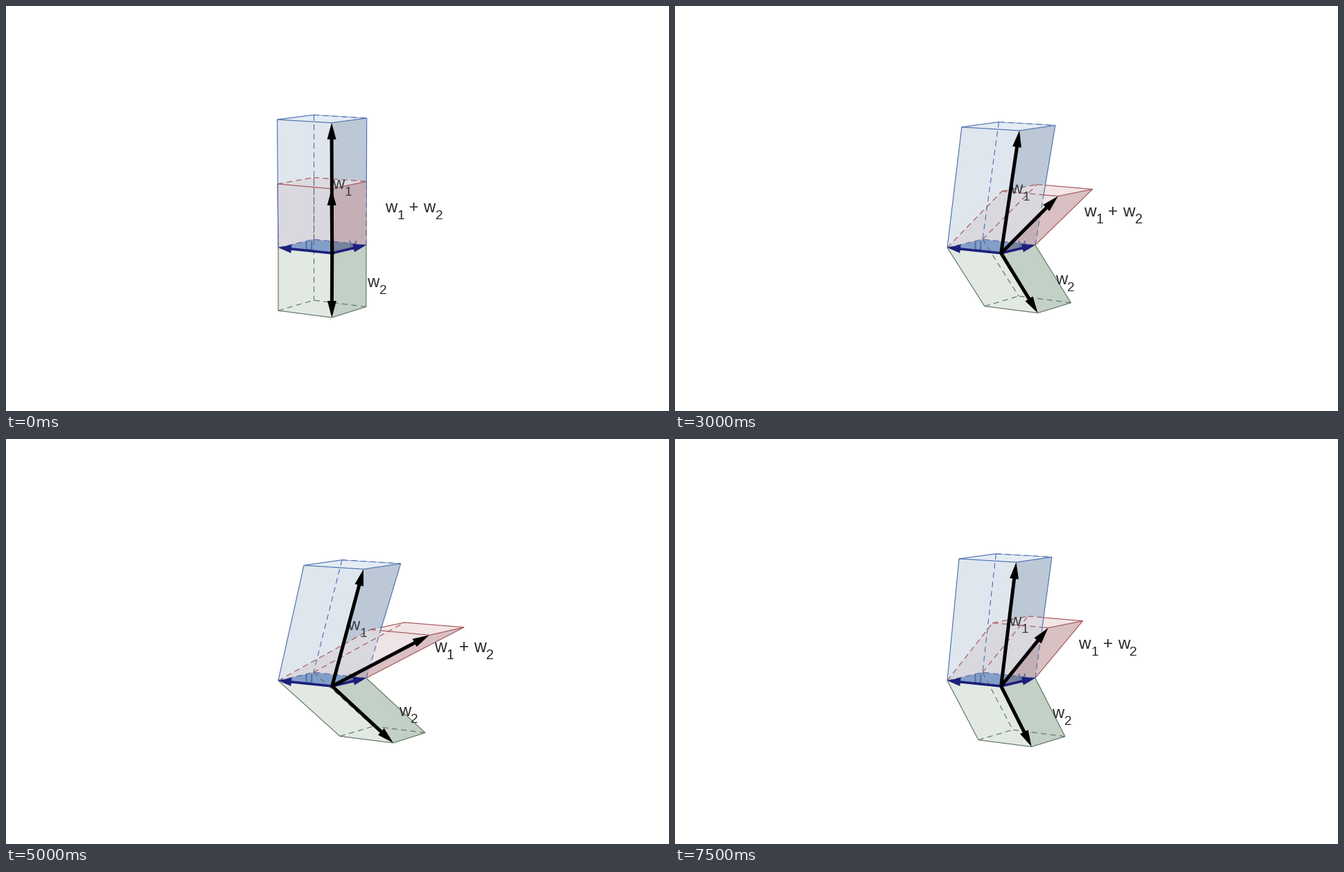
Write a matplotlib script that moves like this. It is 957 by 585 pixels and loops after 8000 ms.

```python
import matplotlib.pyplot as plt
import numpy as np
from matplotlib.animation import FuncAnimation
from matplotlib.patches import Polygon

W, H, DPI = 957, 585, 100
PX = 72 / DPI
STEPS, FRAMES, INTERVAL = 10, 16, 500

plt.rcParams["font.family"] = "Liberation Sans"
fig = plt.figure(figsize=(W / DPI, H / DPI), dpi=DPI, facecolor="white")
ax = fig.add_axes([0, 0, 1, 1])

# Corners run left, front, right, back.
BASE = np.array([(393, 349), (470.7, 357), (520, 345.3), (444, 337)])

# Far face of each box at the start, middle and end of the swing.
BLUE = np.array([
    [(391.5, 164), (470, 168.7), (520.7, 162), (444, 157.3)],
    [(410, 173), (492.5, 178), (544, 170.5), (463.3, 165.8)],
    [(430, 182.5), (516, 188), (569.7, 180), (485, 174.7)],
])
RED = np.array([
    [(392, 257), (470, 264), (520.3, 253.5), (444, 247.7)],
    [(458.5, 265.7), (538.7, 272.7), (588.5, 262.8), (509.5, 256)],
    [(526, 275.3), (611, 283.3), (661, 272), (575.5, 265)],
])
GREEN = np.array([
    [(393, 440), (470.3, 450), (519.8, 434.5), (444, 425)],
    [(438, 434.7), (514.7, 444.5), (563, 429.7), (487.5, 420)],
    [(482, 429.3), (559, 439), (605, 424.3), (530, 415)],
])

BLUE_EDGE, RED_EDGE, GREEN_EDGE = "#4a70b0", "#a25556", "#5f7263"
NAVY = "#1c1f7c"


def swing(keys, p):
    """Quadratic through the three key poses, p from 0 to 1."""
    a, m, b = keys
    return a * (1 - p) * (1 - 2 * p) + m * 4 * p * (1 - p) + b * p * (2 * p - 1)


def face(points, color, z, clip=None):
    patch = Polygon(points, closed=True, fc=color, ec="none", lw=0, zorder=z)
    ax.add_patch(patch)
    if clip is not None:
        patch.set_clip_path(clip)
    return patch


def edge(points, color, z, dashed=False, clip=None, width=1.15):
    xs, ys = np.transpose(points)
    line, = ax.plot(xs, ys, color=color, lw=width * PX, zorder=z,
                    solid_capstyle="butt", dash_capstyle="butt")
    if dashed:
        line.set_dashes((8 / width, 5.5 / width))
    if clip is not None:
        line.set_clip_path(clip)


def arrow(tail, tip, color, z, width, length, half):
    d = (tip - tail) / np.hypot(*(tip - tail))
    n = np.array([-d[1], d[0]])
    neck = tip - d * length
    edge([tail, neck + d], color, z, width=width)
    face([tip, neck + n * half, neck - n * half], color, z)


def label(x, y, parts, size, color, z):
    """Write (text, is_subscript) parts one after another."""
    for text, sub in parts:
        t = ax.text(x, y + 10 * sub, text, fontsize=size * (0.8 if sub else 1) * PX,
                    color=color, va="baseline", ha="left", zorder=z)
        advance = {"w": 0.722, " + ": 1.14}.get(text, 0.556 * 0.8)
        x += advance * size


def sides(top):
    left = [BASE[0], BASE[1], top[1], top[0]]
    right = [BASE[1], BASE[2], top[2], top[1]]
    return left, right


def green_box(top):
    left, right = sides(top)
    face(left, "#e2e9e3", 1)
    face(right, "#c3d0c6", 1)
    edge([BASE[0], top[0], top[1], top[2], BASE[2]], GREEN_EDGE, 2)
    edge([BASE[3], top[3]], GREEN_EDGE, 8, dashed=True)
    edge([top[0], top[3]], GREEN_EDGE, 8, dashed=True)
    edge([top[2], top[3]], GREEN_EDGE, 8, dashed=True)


def red_box(top):
    left, right = sides(top)
    face(left, "#eee3e5", 3)
    face(right, "#d9c0c2", 3)
    face(top, "#f3e5e6", 3)
    edge([BASE[0], top[0], top[1], top[2], BASE[2]], RED_EDGE, 4)
    edge([top[0], top[3], top[2]], RED_EDGE, 4)
    edge([BASE[3], top[3]], RED_EDGE, 8, dashed=True)


def blue_box(top):
    left, right = sides(top)
    face(left, "#e0e6ee", 5)
    face(right, "#bcc8d6", 5)
    face(top, "#e5ecf5", 5)
    edge([BASE[0], top[0], top[1], top[2]], BLUE_EDGE, 9)
    edge([top[0], top[3]], BLUE_EDGE, 9)
    edge([top[3], top[2]], BLUE_EDGE, 9, width=0.6)
    edge([top[3], top[2]], BLUE_EDGE, 9, dashed=True)
    edge([top[3], BASE[3]], BLUE_EDGE, 9, dashed=True)
    # The right edge is hidden where the red box stands before it.
    out = BASE[2] + 0.43 * (top[2] - BASE[2])
    edge([BASE[2], out], BLUE_EDGE, 9, dashed=True)
    edge([out, top[2]], BLUE_EDGE, 9)


def overlap(blue, red, upright):
    """The part of the red box seen through the blue one."""
    hull = [BASE[0], BASE[1], BASE[2], blue[2], blue[3], blue[0]]
    clip = face(hull, "none", 5)
    left, right = sides(red)
    face(left, "#d9d8de", 6, clip)
    face(right, "#c5afb6", 6, clip)
    face(red, "#dddae0", 6, clip)
    for a, b in ((0, 3), (3, 2)):
        edge([red[a], red[b]], RED_EDGE, 8, True, clip)
    edge([BASE[0], red[0]], RED_EDGE, 8, True, clip)
    edge([red[0], red[1], red[2]], RED_EDGE, 8, not upright, clip)


def base_face(red):
    face(BASE, "#829fc9", 7)
    clip = face(sides(red)[1], "none", 7)
    face(BASE, "#77829f", 7, clip)
    edge([BASE[0], BASE[3], BASE[2]], "#62689c", 8, dashed=True)
    for x, y, s in ((431, 353, "u"), (495, 351.5, "v")):
        ax.text(x, y, s, fontsize=23 * PX, color="#566f9f", zorder=8)


def draw(i):
    ax.clear()
    ax.set(xlim=(0, W), ylim=(H, 0))
    ax.axis("off")

    s = STEPS - abs(STEPS - i)
    p = s / STEPS
    blue, red, green = (swing(k, p) for k in (BLUE, RED, GREEN))

    green_box(green)
    red_box(red)
    blue_box(blue)
    overlap(blue, red, s == 0)
    base_face(red)

    w1 = [("w", False), ("1", True)]
    w2 = [("w", False), ("2", True)]
    label(471 + 22 * p, 264 + 12 * p, w1, 24, "#3a3d44", 10)
    label(521.5 + 45.5 * p, 406 - 6 * p, w2, 24, "#2c2f2d", 10)
    label(547 + 71 * p, 298 + 9.7 * p, w1 + [(" + ", False)] + w2,
          24 + 0.7 * p, "#2a2a2a", 10)

    origin = BASE[1]
    for tip in (BASE[0], BASE[2]):
        arrow(origin, tip, NAVY, 11, 3.6, 19, 6)
    for top in (green, blue, red):
        arrow(origin, top[1], "black", 12, 5, 24, 6.5)
    ax.plot(*origin, "o", ms=5 * PX, mew=0, color="black", zorder=12)
    return []


anim = FuncAnimation(fig, draw, frames=FRAMES, init_func=lambda: draw(0),
                     interval=INTERVAL, repeat=True, repeat_delay=0, blit=False)
plt.show()
```
